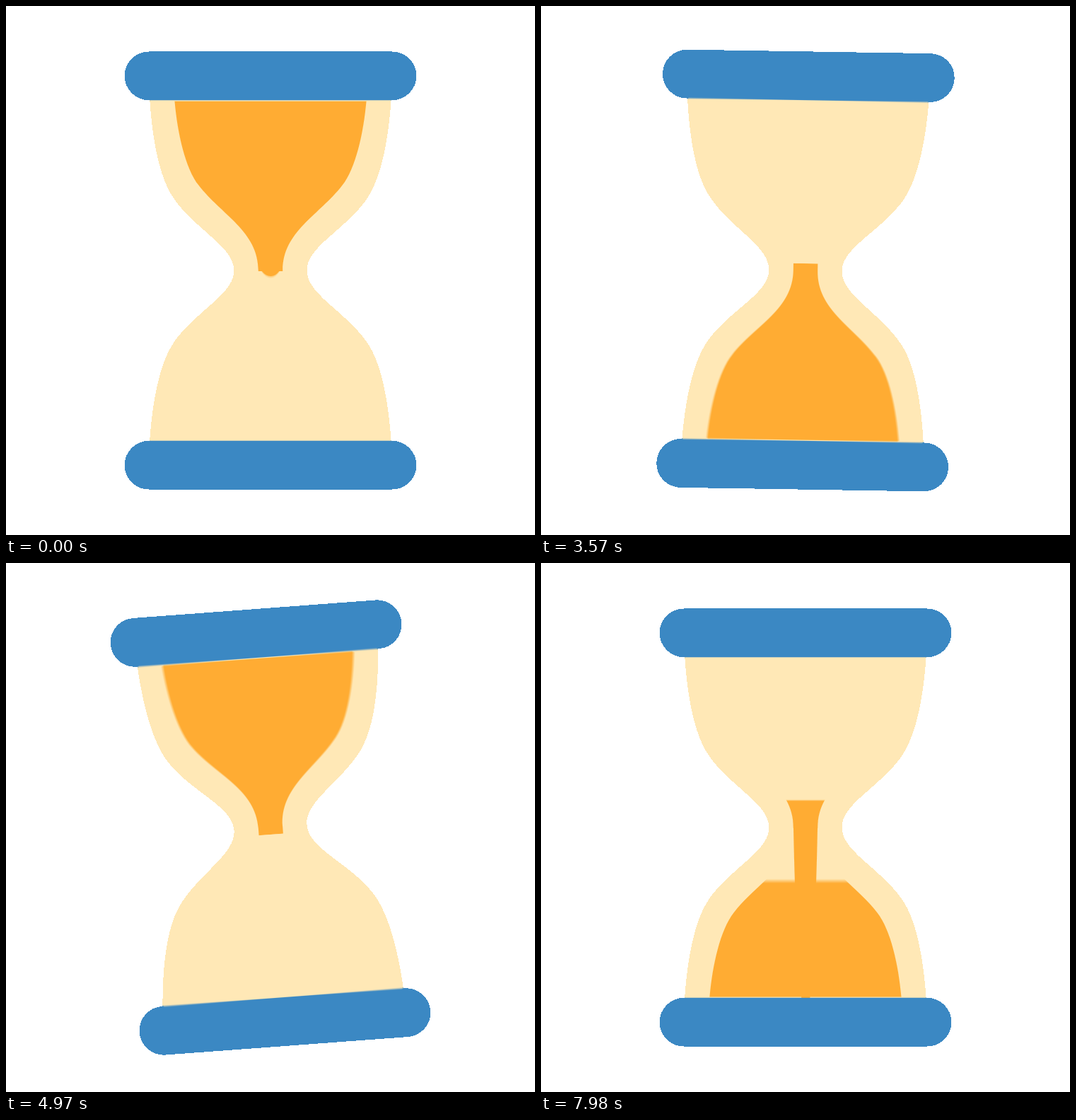
Animation of 748x748 px, one loop 8000 ms. Source, as an HTML page with a canvas:

```html
<!DOCTYPE html>
<html lang="en">
<head>
<meta charset="utf-8">
<title>Hourglass</title>
<style>
  html, body { margin: 0; height: 100%; overflow: hidden; background: #fff; }
  canvas { display: block; width: 100vw; height: 100vh; }
</style>
</head>
<body>
<canvas id="stage" width="748" height="748"></canvas>
<script>
const SIZE = 748, UNIT = 17.2;
const LOOP = 8000, STEP = 70, CYCLE = 5250, TURN_START = 3500;
const SHUTTER = 35, SAMPLES = 15;
const NECK = 0.58, BRIM = -13.93;

// Materials are drawn as pure channels, so blurred frames hold exact mixing weights.
const FRAME = '#f00', GLASS = '#0f0', SAND = '#00f';
const PALETTE = [[59, 136, 195], [255, 232, 182], [255, 172, 51]];

// Shapes in units, with the origin at the middle of the neck.
const glass = new Path2D(
  'M3 0c0-2.001 3.246-3.369 5-6 2-3 2-10 2-10H-10s0 7 2 10c1.754 2.631 5 3.999 5 6' +
  's-3.246 3.369-5 6c-2 3-2 10-2 10H10s0-7-2-10c-1.754-2.631-5-3.999-5-6z');
const chamber = new Path2D(
  `M-1 ${NECK}V0C-1-3.22-4.034-4.561-5.9-7C-7-8.4-7.65-11.3-7.88 ${BRIM}` +
  `H7.88C7.65-11.3 7-8.4 5.9-7C4.034-4.561 1-3.22 1 0V${NECK}z`);
const bars = new Path2D();
for (const y of [-18, 14]) bars.roundRect(-12, y, 24, 4, 2);

const newContext = (canvas, options) => {
  canvas.width = canvas.height = SIZE;
  return canvas.getContext('2d', options);
};
const screen = newContext(document.getElementById('stage'));
const scene = newContext(document.createElement('canvas'));
const blend = newContext(document.createElement('canvas'), { willReadFrequently: true });

const mix = (a, b, k) => a + (b - a) * k;
const smooth = (time, start, end) => {
  const u = Math.min(1, Math.max(0, (time - start) / (end - start)));
  return u * u * (3 - 2 * u);
};

// Ease with control points (x1, 0) and (x2, 1).
function ease(x, x1, x2) {
  let lo = 0, hi = 1;
  for (let i = 0; i < 24; i++) {
    const s = (lo + hi) / 2, r = 1 - s;
    if (3 * x1 * s * r * r + 3 * x2 * s * s * r + s * s * s < x) lo = s; else hi = s;
  }
  return lo * lo * (3 - 2 * lo);
}

function clipped(top, bottom, draw) {
  scene.save();
  scene.beginPath();
  scene.rect(-12, top, 24, Math.max(0, bottom - top));
  scene.clip();
  draw();
  scene.restore();
}

function drawStream(tip) {
  const top = 0.06 - NECK, bend = mix(top, tip, 0.36);
  scene.beginPath();
  scene.moveTo(-1, top);
  scene.bezierCurveTo(-0.9, bend, -0.55, tip, 0.03, tip);
  scene.bezierCurveTo(0.55, tip, 0.9, bend, 1, top);
  scene.fill();
}

function drawScene(time) {
  const turn = time > TURN_START
    ? ease((time - TURN_START) / (CYCLE - TURN_START), 0.333, 0.365) : 0;
  scene.setTransform(1, 0, 0, 1, 0, 0);
  scene.clearRect(0, 0, SIZE, SIZE);
  scene.translate(SIZE / 2, SIZE / 2);
  scene.rotate(Math.PI * turn);
  scene.scale(UNIT, UNIT);

  scene.fillStyle = GLASS;
  scene.fill(glass);

  scene.fillStyle = SAND;
  if (time < TURN_START) {
    const level = mix(BRIM, -NECK, smooth(time, 0, TURN_START));
    clipped(level, 0.06, () => scene.fill(chamber));
    clipped(level, 16, () => drawStream(Math.min(15.5, 0.47 + 0.0107 * time)));
  }
  const pile = mix(14, -NECK, smooth(time, 1540, TURN_START));
  clipped(pile, 16, () => {
    scene.scale(1, -1);
    scene.fill(chamber);
  });

  scene.fillStyle = FRAME;
  scene.fill(bars);
}

// Averages the open-shutter time, then gives the outline a hard edge.
function render(time) {
  const phase = time % CYCLE;
  blend.globalCompositeOperation = 'lighter';
  blend.globalAlpha = 1 / SAMPLES;
  blend.clearRect(0, 0, SIZE, SIZE);
  for (let i = 0; i < SAMPLES; i++) {
    const offset = ((i + 0.5) / SAMPLES - 0.5) * SHUTTER;
    drawScene(Math.max(0, phase + offset));
    blend.drawImage(scene.canvas, 0, 0);
  }

  const image = blend.getImageData(0, 0, SIZE, SIZE), px = image.data;
  const [frame, cream, sand] = PALETTE;
  for (let i = 0; i < px.length; i += 4) {
    if (px[i + 3] < 128) {
      px[i] = px[i + 1] = px[i + 2] = 255;
    } else {
      const f = px[i], c = px[i + 1], s = px[i + 2], sum = f + c + s;
      for (let k = 0; k < 3; k++) {
        px[i + k] = (f * frame[k] + c * cream[k] + s * sand[k]) / sum;
      }
    }
    px[i + 3] = 255;
  }
  screen.putImageData(image, 0, 0);
}

const start = performance.now();
let shown = -1;
function tick() {
  const step = Math.floor(((performance.now() - start) % LOOP) / STEP);
  if (step !== shown) render((shown = step) * STEP);
  requestAnimationFrame(tick);
}
tick();
</script>
</body>
</html>
```
